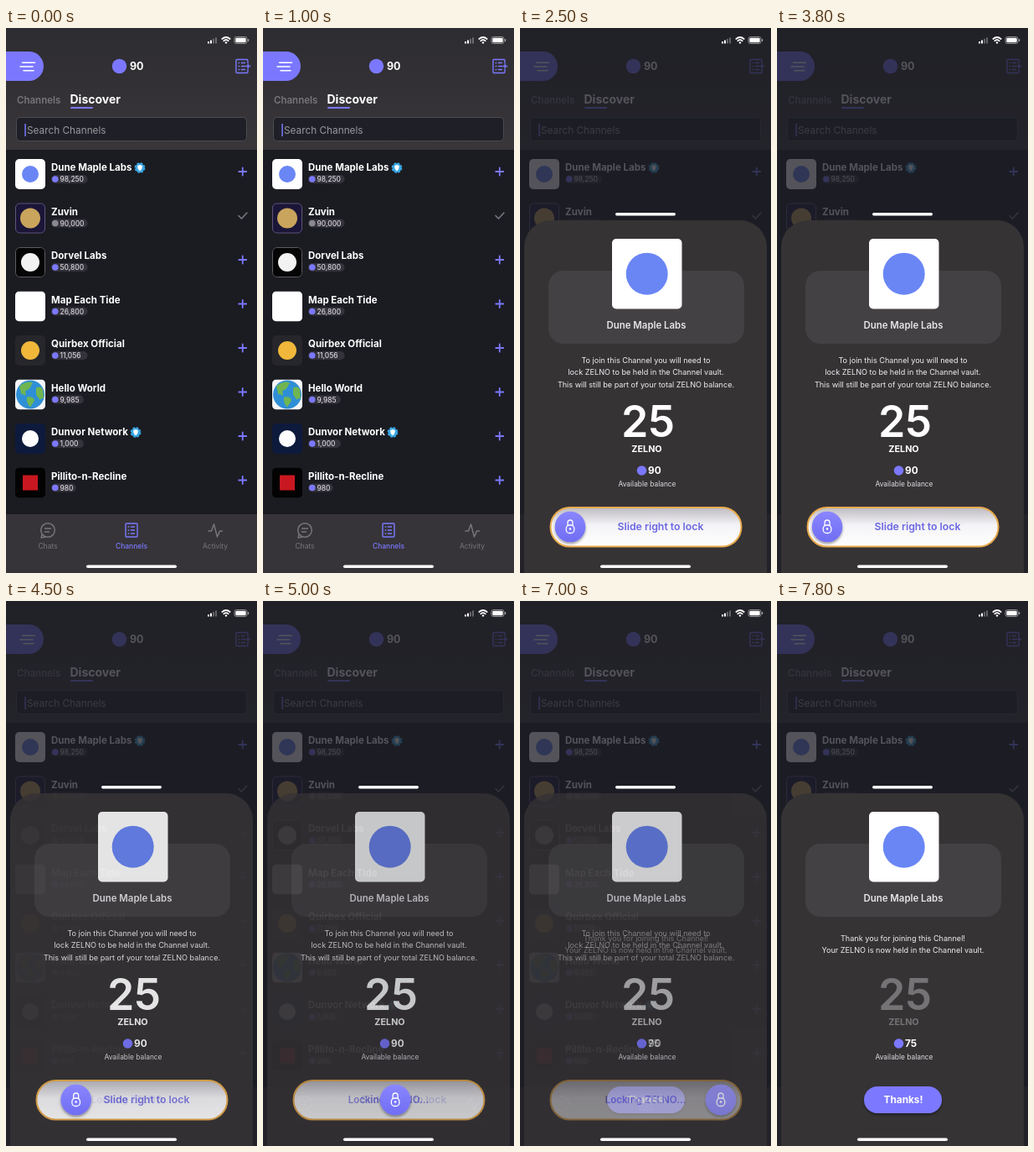
Recreate the animation shown at these times as an HTML page. Size 300 by 649 pixels, loop 8 s.

```html
<!DOCTYPE html>
<html lang="en">
<head>
<meta charset="utf-8">
<title>Join a channel</title>
<style>
  html, body { margin: 0; width: 100%; height: 100%; overflow: hidden; background: #1b1c22; }
  svg { display: block; width: 300px; height: 649px; font-family: Inter, "Open Sans", sans-serif; }
</style>
</head>
<body>
<svg id="stage" viewBox="0 0 300 649" xmlns="http://www.w3.org/2000/svg"></svg>
<script>
const LOOP = 8000;
const ACCENT = '#7b78ff';
const BRAND = 'Dune Maple Labs';
const COIN = 'ZELNO';

const text = (x, y, str, size, weight, fill, anchor = 'start') =>
  `<text x="${x}" y="${y}" font-size="${size}" font-weight="${weight}" fill="${fill}" text-anchor="${anchor}">${str}</text>`;
const mid = (y, str, size, weight, fill, x = 151) => text(x, y, str, size, weight, fill, 'middle');
const box = (x, y, w, h, r, fill, extra = '') =>
  `<rect x="${x}" y="${y}" width="${w}" height="${h}" rx="${r}" fill="${fill}" ${extra}/>`;
const dot = (x, y, r, fill, extra = '') => `<circle cx="${x}" cy="${y}" r="${r}" fill="${fill}" ${extra}/>`;
const line = (d, stroke, w = 1.5) =>
  `<path d="${d}" fill="none" stroke="${stroke}" stroke-width="${w}" stroke-linecap="round" stroke-linejoin="round"/>`;

const defs = `<defs>
  <linearGradient id="head" x2="0" y2="1"><stop stop-color="#2d2c30"/><stop offset="1" stop-color="#39363a"/></linearGradient>
  <linearGradient id="track" x2="0" y2="1"><stop stop-color="#bdbbc2"/><stop offset=".45" stop-color="#f4f3f6"/><stop offset="1" stop-color="#fff"/></linearGradient>
  <linearGradient id="ball" x2="0" y2="1"><stop stop-color="#8a86ff"/><stop offset="1" stop-color="#706df2"/></linearGradient>
  <filter id="shade" x="-30%" y="-30%" width="160%" height="170%"><feDropShadow dx="0" dy="2" stdDeviation="1.8" flood-opacity=".4"/></filter>
  <clipPath id="tile"><rect x="-18" y="-18" width="36" height="36" rx="5"/></clipPath>
</defs>`;

// Tile art is drawn around 0,0
const globe = dot(0, 0, 17, '#2f8fd6') +
  `<path d="M-13-10Q-4-17 3-14L-1-7L-6-4L-5 1L-11-1Z M-4 3Q4 2 5 7L0 15Q-5 10-4 3Z M7-8Q13-11 15-6L16 4L11 6L7 0Z" fill="#6fb551"/>`;
const rows = [
  { name: BRAND, count: '98,250', bg: '#fff', art: dot(0, 0, 10, '#6a86f5'), badge: 160 },
  { name: 'Zuvin', count: '90,000', bg: '#1b1538', rim: '#5d5578', art: dot(0, 0, 12, '#c9a45c'), coin: '#8b888f', joined: true },
  { name: 'Dorvel Labs', count: '50,800', bg: '#050506', rim: '#5c5a60', art: dot(0, 0, 11, '#f2f2f2') },
  { name: 'Map Each Tide', count: '26,800', bg: '#fff', art: '' },
  { name: 'Quirbex Official', count: '11,056', bg: '#26262b', art: dot(0, 0, 11, '#f0b73a') },
  { name: 'Hello World', count: '9,985', bg: '#f4f6f8', art: globe },
  { name: 'Dunvor Network', count: '1,000', bg: '#0d1a3c', art: dot(0, 0, 10, '#fff'), badge: 155 },
  { name: 'Pillito-n-Recline', count: '980', bg: '#030303', art: box(-9, -9, 18, 18, 0, '#c81720') }
];

function badge(x, y) {
  return dot(x, y, 5.4, '#3aa7e4', 'stroke="#3aa7e4" stroke-width="2" stroke-dasharray="2.6 1.64"') +
    `<path d="M${x - 2.8} ${y - 2.5}L${x} ${y - 3.6}L${x + 2.8} ${y - 2.5}Q${x + 3} ${y + 2} ${x} ${y + 3.8}Q${x - 3} ${y + 2} ${x - 2.8} ${y - 2.5}Z" fill="#fff"/>`;
}

function row(r, i) {
  const y = 174 + 52.5 * i;
  const rim = r.rim ? box(-17.5, -17.5, 35, 35, 5, 'none', `stroke="${r.rim}"`) : '';
  const mark = r.joined ? line(`M278 ${y - 3}l3.5 3.5l6.5-7`, '#7d7b82', 1.5)
    : line(`M278.3 ${y - 3}h9M282.8 ${y - 7.5}v9`, ACCENT, 1.8);
  return `<g transform="translate(29 ${y})"><g clip-path="url(#tile)">${box(-18, -18, 36, 36, 0, r.bg)}${r.art}</g>${rim}</g>` +
    text(54, y - 4, r.name, 11.5, 700, '#fff') +
    (r.badge ? badge(r.badge, y - 7.5) : '') +
    box(54, y + 1, 16 + r.count.length * 4.6, 10, 5, '#34323a') +
    dot(58.8, y + 6, 3.8, r.coin || ACCENT) +
    text(64.5, y + 9.1, r.count, 8.4, 500, '#d8d6dc') + mark;
}

function listIcon(x, y, c) {
  return box(x - 7, y - 8, 14, 16, 1, 'none', `stroke="${c}" stroke-width="1.4"`) +
    line([-4, 0, 4].map(d => `M${x - 3.8} ${y + d}h.6M${x - .5} ${y + d}h4`).join(''), c, 1.5);
}

function home() {
  const grey = '#77757b';
  return box(0, 0, 300, 649, 0, '#1b1c22') + box(0, 0, 300, 145, 0, 'url(#head)') +
    `<path d="M0 28H27.5A17.5 17.5 0 0 1 27.5 63H0Z" fill="${ACCENT}"/>` +
    line('M19.5 41.3H34.5M17 46H32M21 50.7H33', '#fff', 1.5) +
    dot(135.5, 45.5, 8.7, ACCENT) + text(148, 50, '90', 12.5, 700, '#fff') +
    listIcon(282, 45.5, ACCENT) + box(286, 42, 8, 7, 0, '#313034') + line('M286.8 45.5h5M289.3 43v5', ACCENT, 1.5) +
    text(13, 90, 'Channels', 11.5, 600, grey) + text(76.5, 90, 'Discover', 14, 700, '#fff') +
    box(77, 94, 27, 2, 1, ACCENT) +
    box(12.5, 106.5, 275, 28, 4, '#1f2027', 'stroke="#4b4a50"') +
    box(22.3, 114, 1.5, 15, 0, ACCENT) + text(25, 125.5, 'Search Channels', 11.8, 400, '#99979c') +
    rows.map(row).join('') +
    box(0, 579, 300, 70, 0, '#363438') +
    dot(50, 598, 8.3, 'none', `stroke="${grey}" stroke-width="1.5"`) +
    line('M43 603l-1 4l5-1M46.5 596h7M46.5 600h5', grey, 1.4) +
    listIcon(150, 598, ACCENT) +
    line('M242 599h3.5l3-8l4 15l3-7h3', grey, 1.5) +
    mid(620, 'Chats', 8.5, 400, grey, 50) + mid(620, 'Channels', 8.5, 500, ACCENT, 150) + mid(620, 'Activity', 8.5, 400, grey, 250);
}

function statusBar() {
  return [0, 1, 2, 3].map(i => box(241 + i * 3, 16 - i * 1.6, 2, 2.5 + i * 1.6, .5, '#fff', i > 1 ? 'opacity=".3"' : '')).join('') +
    line('M258.3 13Q263 9 267.7 13M260.2 15.3Q263 13 265.8 15.3', '#fff', 1.7) + dot(263, 17.4, 1.2, '#fff') +
    box(273, 10.5, 15, 8, 2.3, 'none', 'stroke="#aaa" stroke-width=".8"') + box(274.3, 11.8, 12.4, 5.4, 1.2, '#fff') +
    box(289, 13, 1.2, 3, .6, '#aaa');
}

function sheet(id, lines, top, gap, balance, tone, action) {
  return `<g id="${id}">` +
    `<path d="M5 649V261A32 32 0 0 1 37 229H263A32 32 0 0 1 295 261V649Z" fill="#363335"/>` +
    box(34, 289, 234, 87, 18, '#444144') + box(110, 251, 83.5, 83.5, 5, '#fff') +
    dot(151.7, 292.7, 25, '#6a86f5') + mid(358, BRAND, 11.4, 600, '#e6e5e8') +
    lines.map((s, i) => mid(top + gap * i, s, 9.1, 400, '#efeef0', 150.5)).join('') +
    mid(487, '25', 52, 600, tone, 153) + mid(505, COIN, 10.8, 700, tone, 151.5) +
    dot(145.5, 527, 5.8, ACCENT) + text(153, 531, balance, 11.8, 700, '#fff') +
    mid(546, 'Available balance', 8.4, 400, '#dddce0', 152) + action + '</g>';
}

const joinLines = [
  'To join this Channel you will need to',
  `lock ${COIN} to be held in the Channel vault.`,
  `This will still be part of your total ${COIN} balance.`
];
const doneLines = ['Thank you for joining this Channel!', `Your ${COIN} is now held in the Channel vault.`];
const track = box(36.5, 571, 228, 46.5, 23.2, 'url(#track)', 'stroke="#e9ab4c" stroke-width="2"');
const label = '#6a66e2';
const thanks = box(104, 578, 93, 32, 16, ACCENT, 'filter="url(#shade)"') + mid(598.3, 'Thanks!', 11.8, 700, '#fff');

const knob = `<g id="knob">` + dot(0, 594, 18.3, 'url(#ball)', 'filter="url(#shade)"') +
  box(-4.8, 592, 9.6, 9.5, 4, 'none', 'stroke="#fff" stroke-width="1.3"') +
  line('M-3 592.5V589A3 3 0 0 1 3 589V592.5', '#fff', 1.3) + dot(0, 596.5, 1.3, '#fff') + '</g>';

document.getElementById('stage').innerHTML = defs + home() +
  `<rect id="scrim" width="300" height="649" fill="#1e1e25"/>` + statusBar() +
  `<g id="modal">` + box(114, 220, 72, 3.5, 1.7, '#fff') +
  sheet('ask', joinLines, 398.5, 14.6, '90', '#fff', track + mid(598.3, 'Slide right to lock', 12.3, 600, label, 168)) +
  sheet('wait', joinLines, 398.5, 14.6, '90', '#fff', track + mid(598.3, `Locking ${COIN}...`, 11.6, 600, label, 150)) +
  sheet('done', doneLines, 405, 14.4, '75', '#757376', thanks) + knob + '</g>' +
  box(96, 639.5, 108, 3.6, 1.8, '#fff');

const el = {};
for (const id of ['scrim', 'modal', 'ask', 'wait', 'done', 'knob']) el[id] = document.getElementById(id);

const span = (t, a, b) => Math.min(1, Math.max(0, (t - a) / (b - a)));
const easeOut = u => 1 - (1 - u) ** 2;
const easeBoth = u => u < .5 ? 2 * u * u : 1 - 2 * (1 - u) ** 2;
const fade = (node, v) => node.setAttribute('opacity', v.toFixed(3));

function draw(t) {
  const rise = easeOut(span(t, 2100, 2500));
  const lock = easeBoth(span(t, 4020, 5895));
  const finish = easeOut(span(t, 6900, 7450));
  fade(el.scrim, .76 * rise);
  el.modal.setAttribute('transform', `translate(0 ${(435 * (1 - rise)).toFixed(2)})`);
  fade(el.ask, 1 - lock);
  fade(el.wait, lock * (1 - finish));
  fade(el.done, finish);
  fade(el.knob, 1 - finish);
  el.knob.setAttribute('transform', `translate(${(60 + 180 * lock).toFixed(2)} 0)`);
}

const start = performance.now();
function tick() {
  draw((performance.now() - start) % LOOP);
  requestAnimationFrame(tick);
}
tick();
</script>
</body>
</html>
```
